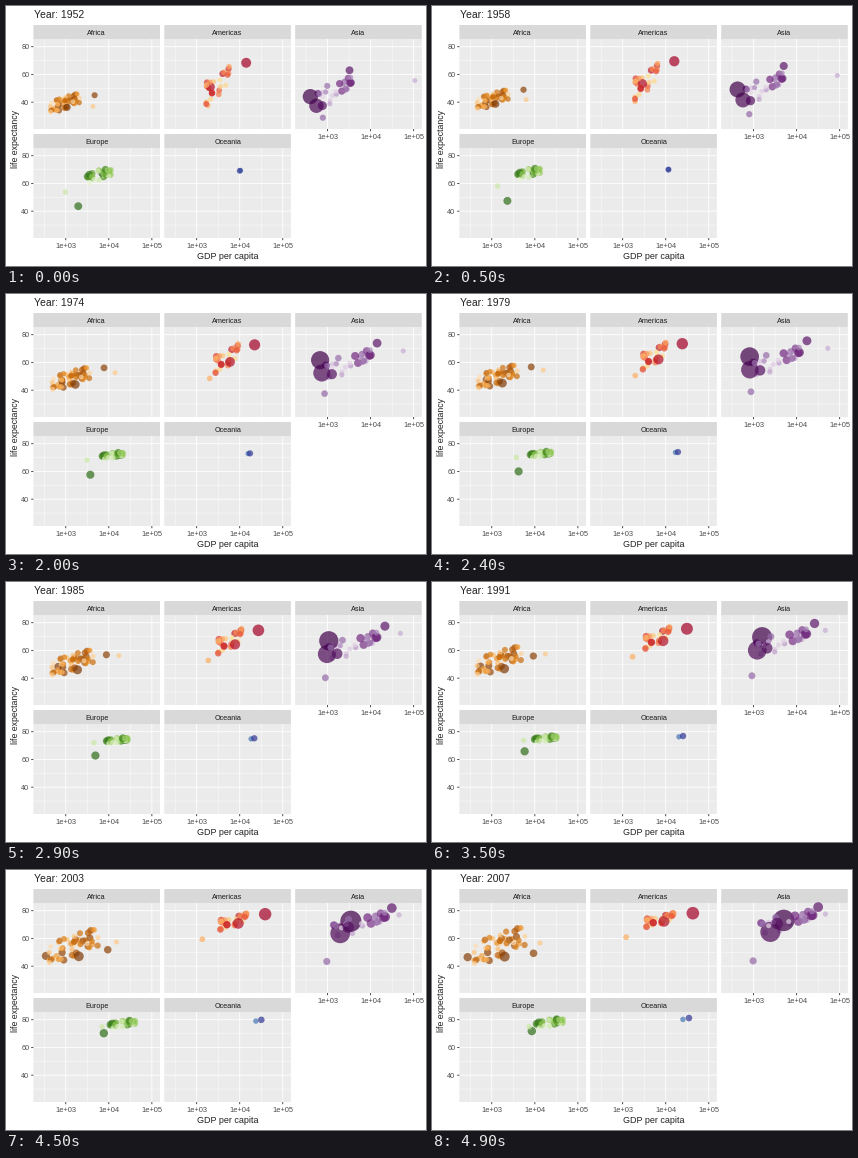
Write a matplotlib script that moves like this. It is 420 px wide and 260 px high and loops after 5000 ms.

```python
import matplotlib.pyplot as plt
import numpy as np
from matplotlib.animation import FuncAnimation
from matplotlib.colors import LinearSegmentedColormap
from matplotlib.patches import Rectangle

W, H, DPI = 420, 260, 100
PX = 72 / DPI  # points per pixel
FRAMES, INTERVAL = 50, 100
PANEL_W, PANEL_H, STRIP_H = 126.6, 90, 14
X_MIN, X_MAX = 2.248, 5.189  # log10 of GDP
Y_MIN, Y_MAX = 20.65, 85.55
MAX_POP = 1319

plt.rcParams["font.family"] = "Liberation Sans"
rng = np.random.default_rng(7)


def crowd(count, gdp, gdp_spread, life, life_spread, pop_range):
    """Random countries around a mean path; richer ones tend to live longer.

    Paths are (log GDP, life expectancy) at the start, middle and end."""
    wealth, chance = rng.uniform(-1.7, 1.7, (2, count, 1))
    health = 0.6 * wealth + 0.7 * chance
    x = np.array(gdp) + wealth * np.array(gdp_spread)
    y = np.minimum(np.array(life) + health * np.array(life_spread), 82)
    pop = 10 ** rng.uniform(*pop_range, count)
    return [(list(zip(*path)), p) for path, p in zip(zip(x, y), pop)]


class Continent:
    def __init__(self, countries, start_share, colors):
        order = rng.permutation(len(countries))
        self.paths = np.array([countries[i][0] for i in order])
        self.pop = np.array([countries[i][1] for i in order])
        self.start_share = start_share
        rank = np.argsort(np.argsort(-self.pop)) / (len(countries) - 1)
        self.colors = LinearSegmentedColormap.from_list("", colors)(rank ** 0.85)

    def state(self, u):
        """Log GDP, life expectancy and population at loop position u in 0..1."""
        t = 2 * u
        blend = [(1 - t) * (2 - t) / 2, t * (2 - t), t * (t - 1) / 2]
        log_gdp, life = np.einsum("k,nkc->cn", blend, self.paths)
        pop = self.pop * (self.start_share + (1 - self.start_share) * u)
        return log_gdp, life, pop


class Panel:
    def __init__(self, name, left, strip_top, continent):
        self.name, self.left, self.continent = name, left, continent
        self.strip_top, self.top = strip_top, strip_top + STRIP_H
        self.right, self.bottom = left + PANEL_W, self.top + PANEL_H

    def x(self, log_gdp):
        return self.left + (log_gdp - X_MIN) / (X_MAX - X_MIN) * PANEL_W

    def y(self, life):
        return self.top + (Y_MAX - life) / (Y_MAX - Y_MIN) * PANEL_H

    def draw(self, ax):
        for top, height, color in ((self.strip_top, STRIP_H, "#D9D9D9"),
                                   (self.top, PANEL_H, "#EBEBEB")):
            ax.add_patch(Rectangle((self.left, top), PANEL_W, height,
                                   fc=color, lw=0, snap=False))
        label(ax, self.left + PANEL_W / 2, self.strip_top + 9.9, self.name, 7.3, "#1A1A1A")
        for offset, width in ((0.5, 0.43), (0, 0.85)):
            for i in range(3):
                x, y = self.x(3 + i - offset), self.y(40 + 20 * (i - offset))
                line(ax, [x, x], [self.top, self.bottom], "white", width)
                line(ax, [self.left, self.right], [y, y], "white", width)
        self.dots = ax.scatter([0], [0], linewidths=0, alpha=0.7, zorder=3)

    def draw_x_axis(self, ax):
        for v in (3, 4, 5):
            line(ax, [self.x(v)] * 2, [self.bottom, self.bottom + 2.2], "#333333", 0.85)
            label(ax, self.x(v), self.bottom + 10.2, f"1e+0{v}", 7.5, "#4D4D4D")

    def draw_y_axis(self, ax):
        for v in (40, 60, 80):
            line(ax, [self.left - 2.2, self.left], [self.y(v)] * 2, "#333333", 0.85)
            label(ax, self.left - 4, self.y(v) + 2.7, str(v), 7.3, "#4D4D4D", ha="right")

    def update(self, u):
        log_gdp, life, pop = self.continent.state(u)
        diameter = 1.7 * (2 + 10 * np.sqrt(pop / MAX_POP)) + 1.1
        self.dots.set_offsets(np.column_stack([self.x(log_gdp), self.y(life)]))
        self.dots.set_sizes((diameter * PX) ** 2)
        self.dots.set_facecolors(self.continent.colors)


def label(ax, x, y, text, size, color, ha="center", va="baseline", rotation=0):
    return ax.text(x, y, text, fontsize=size * PX, color=color,
                   ha=ha, va=va, rotation=rotation)


def line(ax, xs, ys, color, width):
    ax.plot(xs, ys, color=color, lw=width * PX, solid_capstyle="butt",
            zorder=2, snap=False)


# Outstanding countries have their own path and population in millions.
africa = Continent(
    crowd(48, (2.98, 3.14, 3.18), (0.2, 0.27, 0.35),
          (39.5, 50, 55), (3.8, 4.8, 7.5), (-0.2, 1.6)) + [
        ([(3.03, 36.3), (3.25, 45.2), (3.30, 46.9)], 135),
        ([(2.89, 39.1), (2.87, 47.8), (2.44, 46.5)], 65),
        ([(3.67, 45.0), (3.92, 56.8), (3.97, 49.3)], 44),
        ([(3.63, 37.0), (4.20, 54.7), (4.12, 56.7)], 1.5),
    ], 0.26, ["#7F3B08", "#B35806", "#E08214", "#FDB863", "#FEE0B6"])
americas = Continent(
    crowd(22, (3.50, 3.75, 3.88), (0.17, 0.17, 0.2),
          (53, 65.5, 73.7), (7, 5, 2.6), (0.4, 1.7)) + [
        ([(3.32, 50.9), (3.84, 62.4), (3.96, 72.4)], 190),
        ([(3.26, 37.6), (3.29, 50.7), (3.08, 60.9)], 8.5),
        ([(4.15, 68.4), (4.39, 73.6), (4.63, 78.2)], 301),
    ], 0.45, ["#A50026", "#D73027", "#F46D43", "#FDAE61", "#FEE090"])
asia = Continent(
    crowd(27, (3.17, 3.55, 3.79), (0.27, 0.38, 0.42),
          (47, 61, 71.5), (6, 5.5, 4.5), (0, 2.1)) + [
        ([(2.60, 44.0), (2.92, 64.5), (3.70, 73.0)], 1319),
        ([(2.74, 37.4), (2.92, 55.0), (3.39, 64.7)], 1110),
        ([(2.88, 37.5), (3.16, 54.6), (3.55, 70.7)], 224),
        ([(3.51, 63.0), (4.25, 75.8), (4.50, 82.6)], 127),
        ([(2.89, 28.8), (2.94, 39.0), (2.99, 43.8)], 32),
        ([(5.03, 55.6), (4.72, 70.4), (4.67, 77.6)], 2.5),
    ], 0.4, ["#40004B", "#762A83", "#9970AB", "#C2A5CF", "#E7D4E8"])
europe = Continent(
    crowd(27, (3.77, 4.14, 4.34), (0.17, 0.15, 0.19),
          (65.7, 72.5, 77.5), (3.3, 1.5, 2.2), (0.5, 1.8)) + [
        ([(3.29, 43.6), (3.63, 60.3), (3.93, 71.8)], 71),
        ([(3.85, 67.5), (4.33, 73.2), (4.51, 79.4)], 82),
        ([(2.99, 53.8), (3.58, 70.3), (3.87, 74.9)], 4.5),
    ], 0.75, ["#276419", "#4D9221", "#7FBC41", "#B8E186", "#E6F5D0"])
oceania = Continent([
        ([(4.02, 69.4), (4.23, 73.8), (4.40, 80.2)], 4.1),
        ([(4.00, 69.1), (4.29, 74.1), (4.54, 81.2)], 20),
    ], 0.45, ["#313695", "#4575B4"])

fig = plt.figure(figsize=(W / DPI, H / DPI), dpi=DPI, facecolor="white")
ax = fig.add_axes([0, 0, 1, 1])
ax.axis("off")

layout = [("Africa", africa), ("Americas", americas), ("Asia", asia),
          ("Europe", europe), ("Oceania", oceania)]
panels = [Panel(name, 27.4 + 130.9 * (i % 3), 19 + 109 * (i // 3), continent)
          for i, (name, continent) in enumerate(layout)]
for i, panel in enumerate(panels):
    panel.draw(ax)
    if i >= 2:
        panel.draw_x_axis(ax)
    if i % 3 == 0:
        panel.draw_y_axis(ax)

title = label(ax, 27.5, 12.2, "", 10.4, "#222222", ha="left")
label(ax, 221.7, 252.9, "GDP per capita", 9, "#222222")
label(ax, 9.8, 133.5, "life expectancy", 8.8, "#222222", va="center", rotation=90)
ax.set_xlim(0, W)
ax.set_ylim(H, 0)


def update(frame):
    u = frame / (FRAMES - 1)
    title.set_text(f"Year: {round(1952 + 55 * u)}")
    for panel in panels:
        panel.update(u)


anim = FuncAnimation(fig, update, frames=FRAMES, interval=INTERVAL,
                     repeat=True, repeat_delay=0)
plt.show()
```
